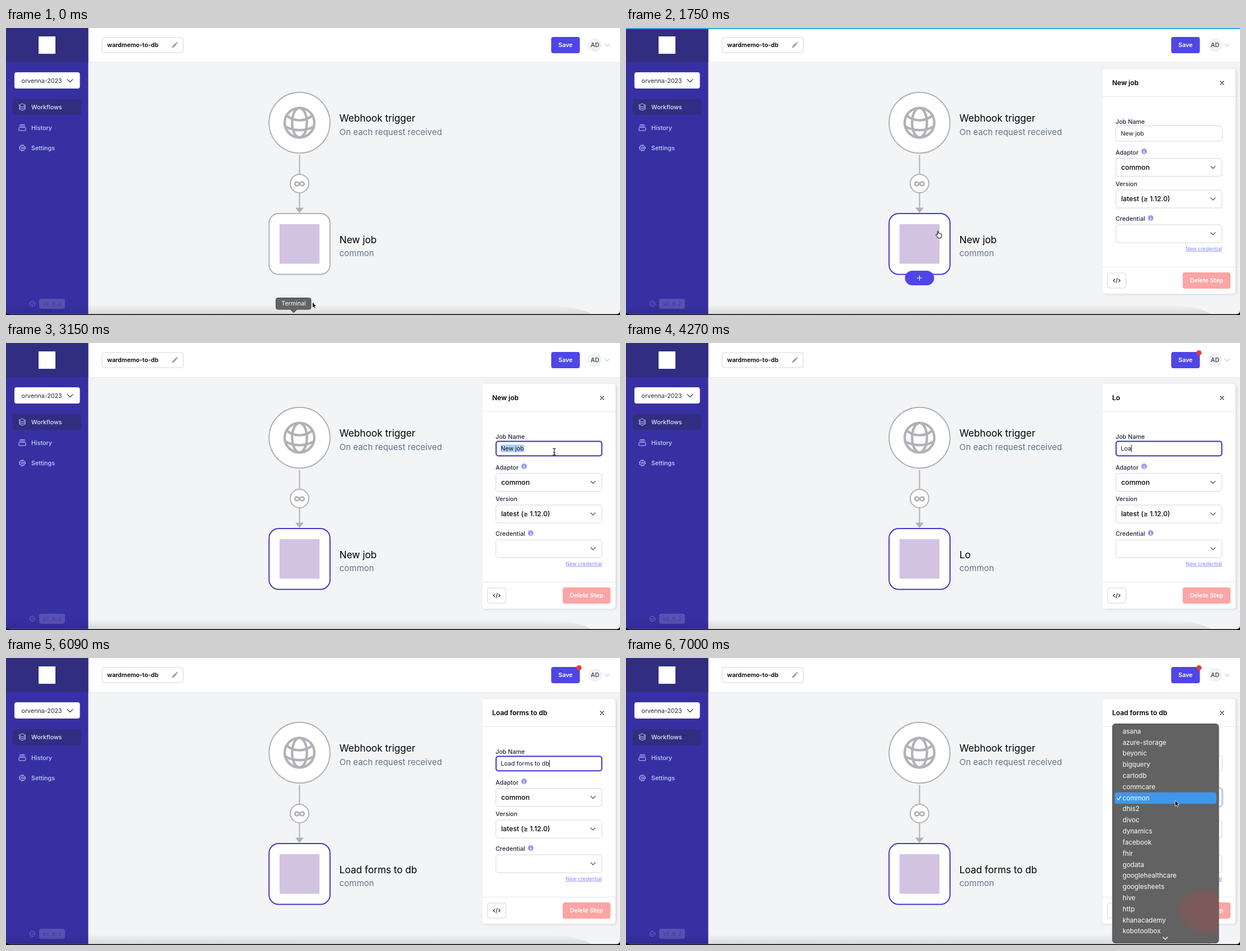
These frames come from a looping animation (1093x512 px, 8000 ms). An HTML page:

```html
<!DOCTYPE html>
<html lang="en">
<head>
<meta charset="utf-8">
<title>Workflow editor</title>
<style>
html, body { margin: 0; width: 100%; height: 100%; overflow: hidden; background: #000; }
svg { display: block; width: 100vw; height: 100vh; font: 10.7px Inter, sans-serif; }
text { white-space: pre; }
.sb { font-weight: 600; }
.md { font-weight: 500; }
.box { fill: #fff; stroke: #d1d5db; }
.line { fill: none; stroke-linecap: round; stroke-linejoin: round; }
.node { fill: #fff; stroke: #b1b1b7; stroke-width: 2; }
.big { font-size: 17.15px; fill: #000; }
.sub { font-size: 15px; fill: #64748b; }
.label { font-weight: 500; fill: #1f2937; }
.value { font-size: 12.2px; font-weight: 500; }
</style>
</head>
<body>
<svg viewBox="0 0 1093 512" preserveAspectRatio="none">
  <defs>
    <clipPath id="window"><rect y="-20" width="1093" height="530.6" rx="6"/></clipPath>
    <linearGradient id="fade" x2="0" y2="1">
      <stop stop-opacity="0"/><stop offset="1" stop-opacity=".11"/>
    </linearGradient>
    <radialGradient id="glow">
      <stop offset=".6" stop-color="#a04f4f" stop-opacity=".42"/><stop offset="1" stop-color="#a04f4f" stop-opacity="0"/>
    </radialGradient>
    <filter id="soft" x="-10%" y="-10%" width="120%" height="120%">
      <feDropShadow dy="1" stdDeviation="2" flood-opacity=".13"/>
    </filter>
    <path id="chevron" class="line" d="M-4-2L0 2 4-2"/>
    <g id="info">
      <circle r="5" fill="#9b9bee"/>
      <path d="M0-2.6v.6M-.8-.4H.1V2.4M-1 2.5H1.2" stroke="#fff" fill="none"/>
    </g>
  </defs>

  <g clip-path="url(#window)">
    <rect width="1093" height="512" fill="#f3f4f6"/>
    <path d="M146 61.5H1093" stroke="#e5e7eb"/>
    <rect x="146" width="947" height="61" fill="#fff"/>
    <rect width="146.4" height="512" fill="#3730a3"/>
    <rect width="146.4" height="61" fill="#312e81"/>

    <!-- sidebar -->
    <rect x="58" y="15" width="30" height="31" fill="#fff"/>
    <rect x="15" y="79" width="116.5" height="29" rx="4" fill="#fff"/>
    <text x="27.5" y="97.5" fill="#1f2937">orvenna-2023</text>
    <use href="#chevron" transform="translate(114 94) scale(1.2)" stroke="#1f2937"/>
    <rect x="12" y="127" width="122" height="28" rx="4" fill="#312e81"/>
    <g class="md" fill="#c7d2fe">
      <text x="45" y="144.8" fill="#e0e7ff">Workflows</text>
      <text x="45" y="181.5">History</text>
      <text x="45" y="218">Settings</text>
    </g>
    <g class="line" stroke="#c7d2fe">
      <path d="M29 135l6 3-6 3-6-3zM25 140l-2 1 6 3 6-3-2-1M25 143l-2 1 6 3 6-3-2-1"/>
      <path d="M25 172.5H33M24 175H34M24.3 177.5H33.7Q35 177.5 35 179V182Q35 183 34 183H24Q23 183 23 182V179Q23 177.5 24.3 177.5Z"/>
      <circle cx="29" cy="214" r="2"/>
      <circle cx="29" cy="214" r="4.6"/>
      <circle cx="29" cy="214" r="5.5" stroke-dasharray="2 2.32" stroke-linecap="butt"/>
    </g>
    <g class="line" stroke="#7771c6">
      <circle cx="47" cy="492" r="4.6"/><path d="M45 492.2l1.5 1.5 2.6-3.3"/>
    </g>
    <rect x="59" y="483" width="46" height="18" rx="4" fill="#5851b3"/>
    <text x="65.5" y="495.3" font-size="9.3" style="font-family:'Liberation Mono',monospace" fill="#3d36a0">v2.0.2</text>

    <!-- header -->
    <rect class="box" x="171" y="17" width="144.5" height="27" rx="4"/>
    <text class="sb" x="180" y="34.2">wardmemo-to-db</text>
    <path d="M295.3 35.5l.8-3.1 5.8-5.8 2.3 2.3-5.8 5.8zM302.6 25.9l1-1q.5-.4 1 0l1.3 1.3q.4.5 0 1l-1 1z" fill="#9ca3af"/>
    <rect x="970.5" y="16" width="51" height="29" rx="4" fill="#4f46e5"/>
    <text class="sb" x="996" y="34.2" text-anchor="middle" fill="#fff">Save</text>
    <circle id="dot" cx="1020" cy="17.5" r="4.6" fill="#e53a3a"/>
    <circle cx="1048.5" cy="30.5" r="12" fill="#f0f1f3"/>
    <text class="sb" x="1048.5" y="34.2" text-anchor="middle" fill="#4b5563">AD</text>
    <use href="#chevron" x="1070" y="30.5" stroke="#9ca3af"/>

    <!-- diagram -->
    <circle class="node" cx="522.5" cy="169" r="54.2"/>
    <g class="line" stroke="#b1b1b7" stroke-width="1.5" transform="translate(487.3 133.8) scale(2.93)">
      <circle cx="12" cy="12" r="9"/><ellipse cx="12" cy="12" rx="4.5" ry="9"/>
      <path d="M4.16 7.58A11.95 11.95 0 0 0 19.84 7.58M3.28 14.25A17.92 17.92 0 0 0 20.72 14.25"/>
    </g>
    <path d="M522.5 226.5V322" stroke="#b1b1b7" stroke-width="2"/>
    <path d="M515 320.5H530L522.5 330Z" fill="#b1b1b7"/>
    <circle class="node" cx="522.5" cy="277.5" r="16.5"/>
    <path class="line" stroke="#b1b1b7" stroke-width="2.8" d="M522.5 278C520.5 275.3 519 274.6 517.7 274.6A3.4 3.4 0 0 0 517.7 281.4C519 281.4 520.5 280.7 522.5 278C524.5 275.3 526 274.6 527.3 274.6A3.4 3.4 0 0 1 527.3 281.4C526 281.4 524.5 280.7 522.5 278Z"/>
    <rect id="job" class="node" x="468.3" y="331" width="108.5" height="108.5" rx="17"/>
    <rect x="487" y="350" width="71" height="70.5" fill="#d2c3e2"/>
    <text class="big" x="593.5" y="167">Webhook trigger</text>
    <text class="sub" x="593.5" y="190.5">On each request received</text>
    <text class="big" id="jobLabel" x="593.5" y="383.5"></text>
    <text class="sub" x="593.5" y="406.7">common</text>
    <g id="plus">
      <rect x="496.5" y="433" width="52" height="26" rx="13" fill="#4f46e5"/>
      <path d="M518 446H527M522.5 441.5V450.5" stroke="#fff" stroke-width="1.2"/>
    </g>

    <!-- job panel -->
    <g id="panel">
      <rect x="848" y="73" width="237" height="401" rx="5" fill="#fff" filter="url(#soft)"/>
      <path d="M848 122.5H1085M848 426.5H1085" stroke="#e5e7eb"/>
      <text class="sb" id="title" x="865.5" y="102" font-size="12"></text>
      <path class="line" d="M1058 95l6 6m0-6l-6 6" stroke="#1f2937" stroke-width="1.2"/>
      <g class="label">
        <text x="871.5" y="170.7">Job Name</text>
        <text x="871.5" y="225.5">Adaptor</text>
        <text x="871.5" y="282">Version</text>
        <text x="871.5" y="344.3">Credential</text>
      </g>
      <use href="#info" x="922.3" y="220"/>
      <use href="#info" x="934" y="339"/>
      <rect class="box" x="871.5" y="174.5" width="190" height="27.5" rx="4.5"/>
      <rect id="focus" x="872.5" y="175.5" width="188" height="25.8" rx="4" fill="#fff" stroke="#4338ca" stroke-width="2"/>
      <rect id="selection" x="881" y="181.3" height="13.4" fill="#a9d0f5"/>
      <text id="field" x="880.7" y="192" fill="#111827"></text>
      <path id="caret" d="M0 181.8V194.6" stroke="#111"/>
      <rect id="ring" x="871" y="231.5" width="191" height="34" rx="6" fill="none" stroke="#cdd3fd" stroke-width="3"/>
      <rect class="box" id="adaptor" x="872" y="232.5" width="188.8" height="32" rx="4.5"/>
      <rect class="box" x="872" y="289" width="188.8" height="32" rx="4.5"/>
      <rect class="box" x="872" y="351" width="188.8" height="32" rx="4.5"/>
      <text class="value" x="881.5" y="252.5">common</text>
      <text class="value" x="881.5" y="308.8">latest (≥ 1.12.0)</text>
      <g stroke="#4b5563" stroke-width="1.2">
        <use href="#chevron" x="1045" y="248.5"/><use href="#chevron" x="1045" y="305"/><use href="#chevron" x="1045" y="367"/>
      </g>
      <text x="1061" y="396.8" font-size="9.15" text-anchor="end" fill="#818cf8" text-decoration="underline">New credential</text>
      <rect class="box" x="857" y="437" width="33" height="27" rx="4"/>
      <path class="line" d="M870 448l-2.6 2.5 2.6 2.5M877 448l2.6 2.5-2.6 2.5M874.6 446.5l-2.2 8" stroke="#1f2937" stroke-width="1.1"/>
      <rect x="991" y="436" width="85" height="29" rx="4" fill="#fda4a4"/>
      <text class="sb" x="1033.5" y="454.3" text-anchor="middle" fill="#fff">Delete Step</text>
    </g>

    <path d="M0 493H950Q1022 496 1043 511H0Z" fill="url(#fade)"/>
    <g id="progress">
      <rect height="1.8" width="1093" fill="#fff"/>
      <rect id="bar" height="1.8" width="1093" fill="#29d"/>
    </g>
  </g>

  <g id="tip">
    <path d="M484 481.5H539.5Q543 481.5 543 485V498.5Q543 502 539.5 502H518L512 508 506 502H484Q480.5 502 480.5 498.5V485Q480.5 481.5 484 481.5Z" fill="#636465" stroke="#48494a"/>
    <text x="512" y="495.3" text-anchor="middle" fill="#fff">Terminal</text>
  </g>

  <g id="menu">
    <rect x="866" y="117.5" width="189" height="391" rx="5" fill="#626262" stroke="#4d4d4d"/>
    <clipPath id="menuClip"><rect x="866" y="118" width="189" height="390" rx="5"/></clipPath>
    <ellipse cx="1034" cy="452" rx="60" ry="46" fill="url(#glow)" clip-path="url(#menuClip)"/>
    <rect x="870" y="239.7" width="181" height="20.3" rx="4" fill="#4196ea"/>
    <path class="line" d="M874.5 250.3l2.2 3 4-6.5" stroke="#fff" stroke-width="1.4"/>
    <g id="items" font-size="11.65" fill="#fff"></g>
    <use href="#chevron" x="960" y="500" stroke="#fff" stroke-width="1.3"/>
  </g>

  <path id="arrow" d="M0 0V10.2L2.4 8.1 3.9 11.6 5.6 10.9 4.1 7.5H7.2Z" fill="#000" stroke="#fff" stroke-width=".8"/>
  <path id="hand" d="M-2.6.5V-5.2Q-1.7-6.6-.8-5.2V-1.8Q.3-2.6 1.2-1.5 2.2-2.1 3-1 4.6-1.5 4.8.2V3L3.7 6.5H-1.9L-5.3 1.6Q-5.1-.1-3.8.1Z" fill="#fff" stroke="#000" stroke-linejoin="round"/>
  <path id="beam" class="line" d="M-2.4-6Q-.3-6 0-4.8.3-6 2.4-6M0-4.8V4.8M-2.4 6Q-.3 6 0 4.8.3 6 2.4 6M-1.2 1.5H1.2" stroke="#000" stroke-width="1.1"/>
</svg>

<script>
const LOOP = 8000, STEP = 70;
const NAME = 'Load forms to db';
// moment at which each letter shows in the field, and later in the title and diagram
const TYPED = [3640, 3780, 4270, 4410, 4480, 4620, 4690, 4830, 4900, 5040, 5180, 5320, 5390, 5530, 5740, 5880];
const SAVED = [3850, 3990, 4480, 4550, 4620, 4760, 4830, 4970, 5110, 5320, 5320, 5530, 5600, 5600, 5950, 6090];
const ADAPTORS = 'asana azure-storage beyonic bigquery cartodb commcare common dhis2 divoc dynamics facebook fhir godata googlehealthcare googlesheets hive http khanacademy kobotoolbox'.split(' ');

const $ = id => document.getElementById(id);
const set = (id, name, value) => $(id).setAttribute(name, value);
const show = (id, on) => set(id, 'opacity', +on);
const within = (t, a, b) => t >= a && t < b;
const part = (t, a, b) => Math.min(1, Math.max(0, (t - a) / (b - a)));
const ease = p => p * p * (3 - 2 * p);
const nameAt = (t, times) => NAME.slice(0, times.filter(at => at <= t).length) || 'New job';

$('items').innerHTML = ADAPTORS.map((name, i) =>
  `<text x="884" y="${134.8 + i * 19.81}">${name}</text>`).join('');

function pointer(t) {
  const move = (a, b, x0, y0, x1, y1) => {
    const p = ease(part(t, a, b));
    return [x0 + (x1 - x0) * p, y0 + (y1 - y0) * p];
  };
  if (t < 2450) return move(0, 350, 545.5, 489, 557, 368);
  if (t < 6300) return move(2380, 2870, 557, 368, 976, 194);
  return move(6300, 6790, 976, 194, 977.5, 254);
}

function drawPointer(t) {
  const [x, y] = pointer(t);
  const seen = !within(t, 3640, 6300);
  const hand = t >= 280 && x < 577 && y < 440;
  const beam = x > 872 && y < 202;
  const kind = hand ? 'hand' : beam ? 'beam' : 'arrow';
  for (const id of ['arrow', 'hand', 'beam']) {
    show(id, seen && id === kind);
    set(id, 'transform', `translate(${x} ${y})`);
  }
}

function draw(t) {
  const label = nameAt(t, SAVED);
  $('jobLabel').textContent = $('title').textContent = label;
  $('field').textContent = nameAt(t, TYPED);
  const width = $('field').getComputedTextLength();

  show('tip', t < 140);
  set('plus', 'opacity', t < 2590 ? part(t, 700, 840) : 0);
  $('job').style.stroke = t >= 1190 ? '#4338ca' : '';

  show('progress', within(t, 1120, 2310));
  set('progress', 'transform', `scale(${t < 1750 ? 0.92 * part(t, 1050, 1610) : 1} 1)`);
  set('bar', 'opacity', 1 - 0.6 * part(t, 1750, 2030) - 0.4 * part(t, 2030, 2310));

  show('panel', t >= 1750);
  show('focus', within(t, 2940, 6860));
  show('selection', within(t, 3080, 3640));
  set('selection', 'width', width);
  show('caret', within(t, 2940, 3080) || within(t, 3640, 6860));
  set('caret', 'transform', `translate(${881 + width} 0)`);
  show('dot', t >= 4060);
  show('ring', t >= 6860);
  $('adaptor').style.stroke = t >= 6860 ? '#a5a9f5' : '';
  show('menu', t >= 7000);
  drawPointer(t);
}

function tick(now) {
  draw(Math.floor(now % LOOP / STEP) * STEP);
  requestAnimationFrame(tick);
}
draw(0);
requestAnimationFrame(tick);
</script>
</body>
</html>
```
